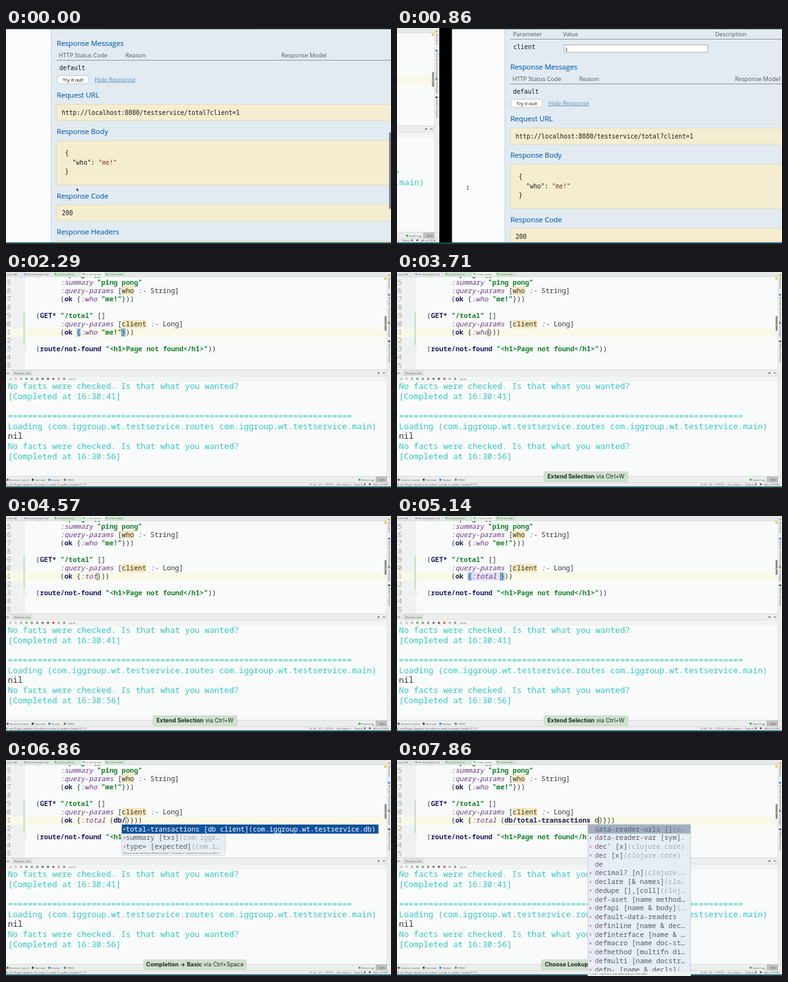
These frames come from a looping animation (600 by 338 pixels, 8 s). An HTML page:

```html
<!DOCTYPE html>
<html lang="en">
<head>
<meta charset="utf-8">
<title>Live coding</title>
<style>
  html, body { margin: 0; width: 100%; height: 100%; overflow: hidden; background: #000; }
  svg { display: block; width: 100vw; height: 100vh; }
  text { white-space: pre; }
  .code { font: 10.65px "Noto Sans Mono", monospace; fill: #303236; }
  .fn { font-weight: 700; fill: #1d1d62; }
  .str { font-weight: 700; fill: #17802e; }
  .key { font-style: italic; fill: #70348a; }
  .num { fill: #a2a5a4; }
  .out { font: 12.78px "Noto Sans Mono", monospace; fill: #36c5c6; }
  .tiny { font: 4.1px "Open Sans", sans-serif; fill: #555; }
  .head { font: 11.2px "Open Sans", sans-serif; fill: #0f62ae; stroke: #0f62ae; stroke-width: .15; }
  .label { font: 9.2px "Open Sans", sans-serif; fill: #555; }
  .mono { font: 9.6px "DejaVu Sans Mono", monospace; fill: #1a1a1a; }
  .btn { font: 8px "Liberation Sans", sans-serif; fill: #222; }
  .tip { font: 8.95px Inter, sans-serif; fill: #1c2a1e; text-anchor: middle; }
</style>
</head>
<body>
<svg viewBox="0 0 600 338" preserveAspectRatio="none">
  <rect width="600" height="338" fill="#000"/>
  <g id="browser">
    <rect x="-12" width="613" height="338" fill="#fafcfb"/>
    <rect x="70" width="531" height="338" fill="#e2ebf2"/>
    <rect x="70" width="1" height="338" fill="#c3d6e6"/>
    <g id="page"></g>
    <rect id="thumb" x="597" width="3" height="120" rx="1.5" fill="#7b8084"/>
    <rect x="-12" width="613" height="1.8" fill="#1c2226"/>
  </g>
  <g id="ide">
    <g id="editor"></g>
    <g id="line"></g>
    <g id="panels"></g>
  </g>
  <rect y="335.5" width="600" height="2.5" fill="#1d4a58"/>
  <g id="pointer" fill="none" stroke="#333" stroke-width=".8"></g>
  <g id="tip"></g>
  <g id="popup"></g>
</svg>
<script>
const LOOP = 8000;
const CW = 6.39, X0 = 46.5, XI = X0 + 6 * CW - 0.3;
const PAPER = '#f8fbf9', GREY = '#eceeed';
const $ = id => document.getElementById(id);
const esc = s => s.replace(/&/g, '&amp;').replace(/</g, '&lt;');
const rect = (x, y, w, h, fill, more = '') =>
  `<rect x="${x}" y="${y}" width="${w}" height="${h}" fill="${fill}" ${more}/>`;
const text = (x, y, s, cls, more = '') => `<text x="${x}" y="${y}" class="${cls}" ${more}>${esc(s)}</text>`;
const dot = (x, y, r, fill) => `<circle cx="${x}" cy="${y}" r="${r}" fill="${fill}"/>`;
const ease = (t, a, b) => {
  const u = Math.min(1, Math.max(0, (t - a) / (b - a)));
  return u * u * (3 - 2 * u);
};
const latest = (list, t) => list.filter(e => e[0] <= t).pop();
const baseline = n => 19.8 + 13.06 * (n - 25);

// Clojure source line with syntax colours
function code(x, y, src) {
  let prev = '';
  const spans = src.match(/"[^"]*"|:[\w-]+|[\w\/*!?-]+|\s+|./g).map(tok => {
    const cls = tok[0] === '"' ? 'str' : /^:./.test(tok) ? 'key'
      : prev === '(' && /\w/.test(tok) ? 'fn' : '';
    prev = tok;
    return `<tspan class="${cls}">${esc(tok)}</tspan>`;
  });
  return `<text x="${x}" y="${y}" class="code">${spans.join('')}</text>`;
}

function buildPage() {
  const box = (y, h) => rect(79, y, 540, h, '#f5edcf', 'stroke="#e3dcc0"');
  const rule = y => rect(79, y, 540, 1, '#8f969b');
  $('page').innerHTML = [
    text(83, -24, 'Parameter', 'label'), text(161, -24, 'Value', 'label'),
    text(398, -24, 'Description', 'label'), rule(-20),
    text(83.5, -4, 'client', 'mono', 'font-weight="700"'),
    rect(162.5, -10.5, 224, 11.5, '#fff', 'stroke="#a9adb0"'), text(164, -1.5, '1', 'btn'),
    text(79, 28, 'Response Messages', 'head'),
    text(82, 46, 'HTTP Status Code', 'label'), text(186, 46, 'Reason', 'label'),
    text(429, 46, 'Response Model', 'label'), rule(50),
    text(83, 65.5, 'default', 'mono'),
    rect(80, 74.5, 49, 12.5, '#fff', 'rx="3" stroke="#b9bec2" stroke-width=".8"'),
    text(104.5, 83.6, 'Try it out!', 'btn', 'text-anchor="middle"'),
    text(138, 83.5, 'Hide Response', 'label', 'style="fill:#5b93c6;text-decoration:underline"'),
    text(79, 109, 'Request URL', 'head'), box(119.5, 25.5),
    text(87, 135.5, 'http://localhost:8080/testservice/total?client=1', 'mono'),
    text(79, 165.5, 'Response Body', 'head'), box(176.5, 69),
    text(92, 198.5, '{', 'mono'), text(92, 213.5, '  "who":', 'mono'),
    text(143.9, 213.5, '"me!"', 'mono', 'style="fill:#84353a"'), text(92, 228, '}', 'mono'),
    text(79, 266.5, 'Response Code', 'head'), box(276.5, 25.5), text(87, 293, '200', 'mono'),
    text(79, 323, 'Response Headers', 'head'), box(333.5, 60)
  ].join('');
}

function buildEditor() {
  let s = rect(-12, 0, 613, 338, PAPER) + rect(-12, 7, 42, 146, '#f0f2f1');
  s += rect(-12, 88.3, 604, 13, '#faf9e8', 'id="row"');
  for (let n = 25; n <= 35; n++) s += text(-4.8, baseline(n), String(n), 'code num');
  s += rect(27, 63, 2.5, 52, '#c5e3c6') + rect(28, 119, 4, 4, PAPER, 'stroke="#d4d6d5" stroke-width=".6"');
  for (const [n, w] of [[26, 3], [30, 6]])
    s += rect(XI + 15 * CW, baseline(n) - 10, w * CW, 13, '#f7e7ba');
  const src = { 24: '(GET* "/ping" []', 25: ':summary "ping pong"', 26: ':query-params [who :- String]',
    27: '(ok {:who "me!"}))', 29: '(GET* "/total" []', 30: ':query-params [client :- Long]',
    33: '(route/not-found "<h1>Page not found</h1>"))' };
  for (const n in src) s += code([24, 29, 33].includes(+n) ? X0 : XI, baseline(n), src[n]);
  $('editor').innerHTML = s;
}

function buildPanels() {
  let s = rect(-12, 0, 613, 7.5, '#e4e8e6') + rect(75, 0, 42, 7, '#d3e8d4') + rect(154, 0, 32, 7, '#d3e8d4');
  s += rect(118, 0, 35, 7.5, '#f1f8f2') + rect(-12, 7, 613, .6, '#c9cecb');
  [[0, 'c.t.w.t.db'], [33, 'wt-test-project.clj'], [80, 'c.t.w.t.core.clj'],
   [124, 'c.t.w.t.routes'], [160, 'c.t.w.t.main']].forEach(([x, label], i) => {
    s += text(x, 4.6, label, 'tiny');
    if (i) s += dot(x - 3, 3.2, 1.5, i > 1 ? '#6cb27b' : '#6c9ac4');
  });
  // console
  s += rect(-12, 153, 613, 10, GREY) + rect(-12, 163, 613, 9, '#f2f4f3');
  s += rect(-12, 152.7, 613, .7, '#c8cbca') + rect(-12, 162.5, 613, .5, '#d6d8d7');
  s += rect(9, 153.4, 32, 9, '#dcdfdd') + text(-3, 159.7, 'REPL', 'tiny') + text(13, 159.7, 'Remote: user', 'tiny');
  s += dot(580.5, 158, 1.5, '#777') + rect(587, 157.5, 4, 1.2, '#777');
  ['#c4c7c5', '#c4c7c5', '#aaa', '#6fa578', '#6fa578', '#888', '#777', '#666', '#c4605c', '#aaa', '#888']
    .forEach((c, i) => { s += rect(5 + i * 8.4, 165.6, 3.2, 3.2, c, 'rx=".8"'); });
  s += text(98, 169, 'a.b ▾', 'tiny') + rect(-12, 172, 613, 147.5, PAPER);
  const lines = ['No facts were checked. Is that what you wanted?', '[Completed at 16:30:41]', '',
    '='.repeat(70), 'Loading (com.iggroup.wt.testservice.routes com.iggroup.wt.testservice.main)', 'nil',
    'No facts were checked. Is that what you wanted?', '[Completed at 16:30:56]'];
  lines.forEach((l, i) => {
    s += text(3, 183.3 + i * 15.6, l, 'out', l === 'nil' ? 'style="fill:#303236"' : '');
  });
  // right tool stripe and error marks
  s += rect(594, 7, 7, 313, GREY) + rect(593.5, 7, .6, 313, '#d2d5d3');
  s += rect(589.5, 8.5, 3.5, 3.5, '#e8c547') + rect(590, 69, 3, 23, '#8c9094') + rect(588, 82, 5, 1, '#e9c95c');
  [[9, 'Structure', '#e2b23e'], [39, 'Remote Cloud Storage', '#4a7fd0'], [84, 'Leiningen', '#888'],
   [112, 'Maven Projects', '#555']].forEach(([y, label, c]) => {
    s += rect(595.5, y - 5, 3, 3, c) + text(0, 0, label, 'tiny', `transform="translate(596 ${y}) rotate(90)"`);
  });
  // tool buttons and status bar
  s += rect(-12, 319.5, 613, 19, GREY) + rect(-12, 319.5, 613, .6, '#c8cbca') + rect(-12, 329, 613, .6, '#cdd0ce');
  [[6, 'Version Control'], [45, 'Terminal'], [71, 'Docker'], [95, 'TODO']].forEach(([x, l], i) => {
    s += rect(x - 5, 323.5, 3.2, 3.2, ['#666', '#444', '#3f86c4', '#777'][i]) + text(x, 326.7, l, 'tiny');
  });
  s += dot(551, 325, 1.8, '#4ba25c') + text(554.5, 326.7, 'Event Log', 'tiny');
  s += rect(576, 320, 18, 9, '#bdc0be') + text(582, 326.7, 'REPL', 'tiny');
  s += text(-3, 333.6, 'IDE and Plugin Updates: the editor is ready to update. (today 07:11)', 'tiny');
  s += text(473, 333.6, '31:23   LF ÷   UTF-8 ÷   Git: master ÷   Parent: 1', 'tiny');
  s += dot(559, 332.2, 1.4, '#666') + dot(567, 332.2, 1.4, '#444') + text(572, 333.6, '446 of 990M', 'tiny');
  $('panels').innerHTML = s;
}

// time, text before caret, text after caret, selected characters before caret
const WHO = '(ok {:who "me!"';
const edits = [[0, WHO, '}))'], [2570, WHO.slice(0, -1), '"}))', 3], [2860, WHO, '}))', 5],
  [3290, '(ok {:who ', '}))'], [3570, '(ok {:who', '}))'], [3850, '(ok {:wh', '}))'],
  [3990, '(ok {:w', '}))'], [4130, '(ok {:', '}))'],
  ...[...'total '].map((_, i) => [4280 + i * 114, '(ok {:' + 'total '.slice(0, i + 1), '}))']),
  [5430, '(ok {:total (', ')}))'], [5860, '(ok {:total (d', ')}))'], [6000, '(ok {:total (db', ')}))'],
  [6200, '(ok {:total (db/', ')}))'], [7140, '(ok {:total (db/total-transactions', ')}))'],
  [7430, '(ok {:total (db/total-transactions ', ')}))'],
  [7570, '(ok {:total (db/total-transactions d', ')}))']];

const tips = [[0], [2570, 'Extend Selection', 'via Ctrl+W', 131], [6430, 'Completion → Basic', 'via Ctrl+Space', 160],
  [7140, 'Choose Lookup Item', 'via Enter', 139]];

const popups = [[0],
  [6430, { x: 180.5, w: 161, wide: 400, col: 16, sel: '#0f529c', ink: '#fff', soft: '#fff',
    hint: 'Did you know that Quick Definition View (^⇧I) works in completion lookups as well? >>',
    rows: ['total-transactions [db client]|(com.iggroup.wt.testservice.db)', 'summary [txs]|(com.iggr…',
      'type= [expected]|(com.i…'] }],
  [7140],
  [7640, { x: 297.5, w: 160, wide: 160, col: 35, sel: '#a0b0bf', ink: '#55616e', soft: '#77838f', typed: 1,
    hint: '^↓ and ^↑ will move caret down and up in the editor',
    rows: ['data-reader-urls []|(c…', 'data-reader-var [sym]|…', "dec' [x]|(clojure.core)", 'dec [x]|(clojure.core)',
      'de', 'decimal? [n]|(clojure.…', 'declare [& names]|(clo…', 'dedupe [],[coll]|(cloj…',
      'def-aset [name method…', 'defapi [name & body]|(…', 'default-data-readers', 'definline [name & dec…',
      'definterface [name & …', 'defmacro [name doc-st…', 'defmethod [multifn di…', 'defmulti [name docstr…',
      'defn- [name & decls]|(…'] }]];

function drawLine([start, pre, post, sel], t, popup) {
  const y = baseline(31), top = y - 10, at = col => XI + col * CW;
  let s = '';
  if (sel) s += rect(at(pre.length - sel), top, sel * CW, 13, '#a9d0f5');
  else if (!popup && t - start > 250 && t > 1700) {
    const open = pre.lastIndexOf(post[0] === '}' ? '{' : '(');
    if (pre.includes(':total')) s += rect(at(open), top, (pre.length - open) * CW, 13, '#e6e0f4');
    for (const c of [open, pre.length]) s += rect(at(c), top, CW, 13, '#93c6f2');
  }
  s += code(XI, y, pre + post);
  const call = pre.indexOf('(db/t');
  if (call > 0)
    s += `<path d="M${at(call + 1)} ${y + 2.8}H${at(pre.length)}" stroke="#d88a86" stroke-width=".8" stroke-dasharray="1.3 1.3"/>`;
  if (t > 1700) s += rect(at(pre.length) - .3, top, .8, 13, '#444');
  return s;
}

function drawTip([, name, via, w]) {
  if (!name) return '';
  return rect(294.5 - w / 2, 312.5, w, 15.5, '#d0e1d0', 'rx="2" stroke="#bccdbb" stroke-width=".6"') +
    `<text x="294.5" y="323.3" class="tip"><tspan font-weight="700">${name}</tspan> ${via}</text>`;
}

function drawPopup([, p]) {
  if (!p) return '';
  const pitch = 13.75, h = Math.min(p.rows.length * pitch, 230), x = XI + p.col * CW, typed = p.typed || 0;
  let s = rect(p.x, 101, p.w, h + 7, '#e6edf4', 'stroke="#bcc4cb" stroke-width=".7"');
  s += rect(p.x, 101, p.wide, pitch + .5, p.sel);
  p.rows.forEach((row, i) => {
    const [name, tail = ''] = row.split('|'), y = 111.6 + i * pitch;
    const ink = i ? '#565b62' : p.ink, soft = i ? '#a3a9af' : p.soft;
    if (name !== 'de') s += dot(p.x + 4, y - 3.4, 1.6, i % 4 === 1 ? '#b58bc4' : '#d99aa6');
    s += `<text x="${x}" y="${y}" class="code" style="fill:${ink}"><tspan fill="#8d5a9a">${name.slice(0, typed)}</tspan>` +
      `${esc(name.slice(typed))}<tspan fill="${soft}">${tail}</tspan></text>`;
  });
  return s + rect(p.x, 101 + h, p.w, 7, '#eef1f2') +
    text(p.x + 2, 101 + h + 4.8, p.hint, 'tiny', 'style="font-size:3.8px"');
}

const cache = {};
function put(id, html) {
  if (cache[id] !== html) $(id).innerHTML = cache[id] = html;
}

function render(t) {
  const scroll = 37 * ease(t, 100, 560), swipe = 633 * ease(t, 650, 1500);
  $('browser').setAttribute('transform', `translate(${swipe} 0)`);
  $('ide').setAttribute('transform', `translate(${swipe - 633} 0)`);
  $('page').setAttribute('transform', `translate(0 ${scroll})`);
  $('thumb').setAttribute('y', 163 - scroll * .4);
  $('row').setAttribute('y', t < 1700 ? 75.3 : 88.3);
  put('pointer', t > 1500 ? '' : t < 650
    ? '<path d="M110 250.5v4.6l1.1-1 1.2 1.6.6-.5-1-1.5h1.4z" fill="#222" stroke="none"/>'
    : '<path d="M109 247.5h2.4M110.2 247.5v5M109 252.5h2.4"/>');
  const popup = latest(popups, t);
  put('line', drawLine(latest(edits, t), t, popup[1]));
  put('tip', drawTip(latest(tips, t)));
  put('popup', drawPopup(popup));
}

buildPage();
buildEditor();
buildPanels();
const began = performance.now();
function tick() {
  render((performance.now() - began) % LOOP);
  requestAnimationFrame(tick);
}
tick();
</script>
</body>
</html>
```
